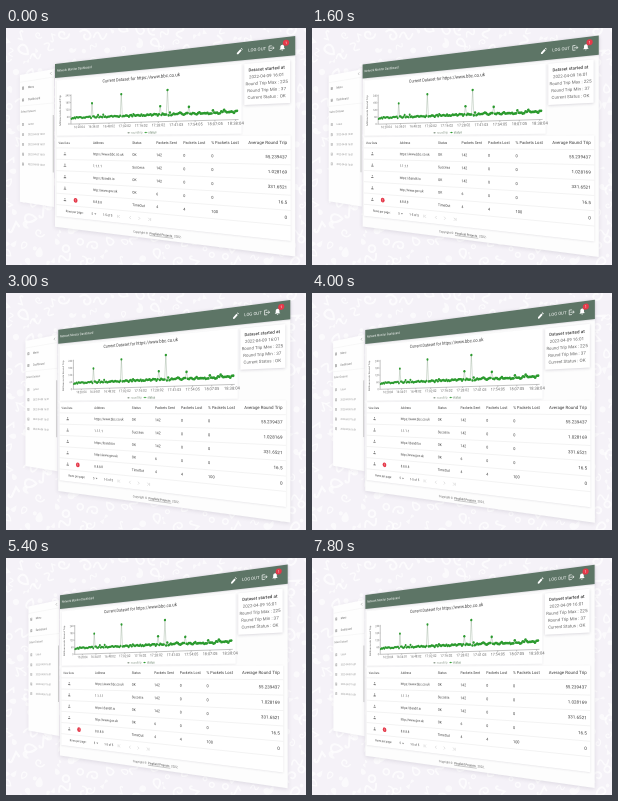
Animation of 300 by 237 pixels, one loop 8000 ms. Source, as an HTML page with a canvas:

```html
<!DOCTYPE html>
<html lang="en">
<head>
<meta charset="utf-8">
<title>Dashboard in perspective</title>
<style>
html, body { margin: 0; width: 100%; height: 100%; overflow: hidden; background: #f5f2f8; }
canvas { display: block; width: 300px; height: 237px; }
</style>
</head>
<body>
<canvas id="stage"></canvas>
<script>
const WIDTH = 300, HEIGHT = 237, HORIZON = 115;
const LOOP = 8000, STEP = 200;
const GREEN = '#5d7566', LEAF = '#2b9a2e', INK = '#3c3c3c', RED = '#e5394a';
const PAGE_WIDTH = 1012;
const FONT = 'Roboto, Arial, sans-serif';

const dpr = window.devicePixelRatio || 1;
const canvas = document.getElementById('stage');
canvas.width = WIDTH * dpr;
canvas.height = HEIGHT * dpr;
const ctx = canvas.getContext('2d');

function seeded(seed) {
  return () => (seed = (seed * 16807) % 2147483647) / 2147483647;
}

function screenSpace() {
  ctx.setTransform(dpr, 0, 0, dpr, 0, 0);
}

// A flat panel turned about a vertical axis: its upright lines stay upright.
// x0, x1: screen edges; h0, h1: height above the horizon at each edge.
class Plane {
  constructor(width, eye, x0, x1, h0, h1) {
    Object.assign(this, { width, eye, x0, x1, h0, h1 });
  }

  project(u, v) {
    const { width, eye, x0, x1, h0, h1 } = this;
    const a = u / width;
    const d = (1 - a) * h1 + a * h0;
    const t = a * h0 / d;
    const dt = h0 * h1 / (d * d * width);
    const k = (h0 + t * (h1 - h0)) / eye;
    return {
      x: x0 + t * (x1 - x0),
      y: HORIZON + (v - eye) * k,
      k,
      dx: (x1 - x0) * dt,
      dy: (v - eye) * (h1 - h0) / eye * dt
    };
  }

  // Draws in panel units around the point (u, v).
  at(u, v, draw) {
    const p = this.project(u, v);
    ctx.setTransform(p.dx * dpr, p.dy * dpr, 0, p.k * dpr, p.x * dpr, p.y * dpr);
    draw();
    screenSpace();
  }

  path(points) {
    ctx.beginPath();
    for (const [u, v] of points) {
      const p = this.project(u, v);
      ctx.lineTo(p.x, p.y);
    }
  }

  line(points, color, weight) {
    this.path(points);
    ctx.strokeStyle = color;
    ctx.lineWidth = weight;
    ctx.stroke();
  }

  rect(u, v, w, h, color, shadow) {
    ctx.save();
    if (shadow) {
      ctx.shadowColor = `rgba(40, 30, 60, ${shadow[0]})`;
      ctx.shadowBlur = shadow[1] * dpr;
      ctx.shadowOffsetY = shadow[1] / 4 * dpr;
    }
    this.path([[u, v], [u + w, v], [u + w, v + h], [u, v + h]]);
    ctx.fillStyle = color;
    ctx.fill();
    ctx.restore();
  }

  dot(u, v, r, color) {
    this.at(u, v, () => {
      ctx.beginPath();
      ctx.arc(0, 0, r, 0, Math.PI * 2);
      ctx.fillStyle = color;
      ctx.fill();
    });
  }

  // Places each letter on its own, so that long lines keep the perspective.
  text(str, u, v, { size = 15, weight = 400, color = INK, align = 0 } = {}) {
    ctx.font = `${weight} ${size}px ${FONT}`;
    ctx.textRendering = 'geometricPrecision';
    ctx.textBaseline = 'middle';
    ctx.fillStyle = color;
    const start = u - ctx.measureText(str).width * align;
    for (let i = 0; i < str.length; i++) {
      const offset = ctx.measureText(str.slice(0, i)).width;
      this.at(start + offset, v, () => ctx.fillText(str[i], 0, 0));
    }
  }
}

function strokeShape(data, color, weight) {
  ctx.strokeStyle = color;
  ctx.lineWidth = weight;
  ctx.stroke(new Path2D(data));
}

function fillShape(data, color) {
  ctx.fillStyle = color;
  ctx.fill(new Path2D(data));
}

const DOODLES = [
  'M-4 0a4 4 0 1 0 8 0a4 4 0 1 0 -8 0',
  'M0 -7C6 -1 6 6 0 6C-6 6 -6 -1 0 -7',
  'M-8 2C-5 -7 -2 -5 0 0S5 6 8 -3',
  'M-3 5a2 2 0 1 0 4 0V-6L6 -3',
  'M-7 3C-7 -6 6 -7 6 0C6 5 -1 5 -1 1'
];

function makeBackground() {
  const layer = document.createElement('canvas');
  layer.width = canvas.width;
  layer.height = canvas.height;
  const g = layer.getContext('2d');
  const rnd = seeded(4127);
  g.fillStyle = '#f5f2f8';
  g.fillRect(0, 0, layer.width, layer.height);
  g.lineCap = 'round';
  for (let row = 0; row < 18; row++) {
    for (let col = 0; col < 22; col++) {
      g.setTransform(dpr, 0, 0, dpr, 0, 0);
      g.translate((col + rnd() * 0.8) * 14, (row + rnd() * 0.8) * 14);
      g.rotate(rnd() * 6.28);
      const size = 0.45 + rnd() * 0.45;
      g.scale(size, size);
      const shape = new Path2D(DOODLES[Math.floor(rnd() * DOODLES.length)]);
      if (rnd() < 0.3) {
        g.fillStyle = 'rgba(255, 255, 255, .6)';
        g.fill(shape);
      } else {
        g.strokeStyle = 'rgba(255, 255, 255, .7)';
        g.lineWidth = 2.4;
        g.stroke(shape);
      }
    }
  }
  return layer;
}

const background = makeBackground();

const spikes = { 21: 165, 49: 223, 83: 115, 89: 232, 106: 100 };
const noise = seeded(907);
const samples = Array.from({ length: 142 }, (_, i) => {
  const value = 44 + noise() * 15 + (noise() < 0.06 ? 11 : 0);
  return [92 + i * 5.15, 275 - (spikes[i] || value) * 0.53];
});

const times = ['16:20:04', '16:34:01', '16:48:02', '17:02:02', '17:16:02',
  '17:28:02', '17:41:03', '17:54:05', '18:07:05', '18:38:04'];

const columns = [205, 395, 502, 615, 724];
const rows = [
  ['https://www.bbc.co.uk', 'OK', '142', '0', '0', '55.239437'],
  ['1.1.1.1', 'Success', '142', '0', '0', '1.028169'],
  ['https://bandit.io', 'OK', '142', '0', '0', '331.6521'],
  ['http://www.gov.uk', 'OK', '6', '0', '0', '16.5'],
  ['8.8.8.8', 'TimeOut', '4', '4', '100', '0']
];

function drawSidebar(p) {
  p.rect(0, 0, 200, 626, '#fefefe', [0.07, 4]);
  p.rect(193, 209, 5, 261, '#c8c8c8');
  p.at(183, 18, () => strokeShape('M3 -6L-3 0L3 6', '#888', 2));
  p.line([[0, 36], [200, 36]], '#f0f0f0', 0.5);
  p.line([[0, 154], [200, 154]], '#f0f0f0', 0.5);

  const items = [['Menu', 67], ['Dashboard', 125], ['Latest', 245]];
  for (let i = 0; i < 4; i++) items.push(['2022-04-0' + (9 - i) + ' 16:01', 295 + i * 48]);
  items.forEach(([label, v], i) => {
    p.at(20, v, () => {
      fillShape('M-6 -7H6V7H-6Z', i < 2 ? '#999' : '#b2b2b2');
      fillShape('M-3 -4H3V-1H-3ZM-3 2H3V4H-3Z', '#fff');
    });
    p.text(label, 50, v, { size: i < 2 ? 15 : 13, color: i < 2 ? '#666' : '#8c8c8c' });
  });
  p.text('Select Dataset', 6, 183, { size: 14, color: '#777' });
}

function drawHeader(p) {
  p.rect(0, 0, PAGE_WIDTH, 64, GREEN, [0.2, 2]);
  p.text('Network Monitor Dashboard', 11, 32, { color: '#fff' });
  p.at(827, 32, () => fillShape('M-9 9V4L3 -8L8 -3L-4 9ZM5 -10L7 -12L12 -7L10 -5Z', '#fff'));
  p.text('LOG OUT', 858, 32, { color: '#fff' });
  p.at(936, 32, () => {
    strokeShape('M1 -8H-8V8H1', '#fff', 2.2);
    strokeShape('M-4 0H8M4 -5L9 0L4 5', '#fff', 2.2);
  });
  p.at(971, 33, () => fillShape('M-9 7L-6 3V-3C-6 -11 6 -11 6 -3V3L9 7ZM-3 9H3L0 12Z', '#fff'));
  p.dot(983, 19, 10, RED);
  p.text('1', 983, 20, { size: 12, color: '#fff', align: 0.5 });
}

function drawChart(p) {
  p.rect(10, 76, 825, 250, '#fff', [0.1, 2]);
  p.text('Current Dataset for https://www.bbc.co.uk', 428, 97, { size: 18.6, align: 0.5 });

  p.at(28, 212, () => {
    ctx.rotate(-Math.PI / 2);
    ctx.font = `13px ${FONT}`;
    ctx.textAlign = 'center';
    ctx.fillStyle = '#555';
    ctx.fillText('Milliseconds Round Trip', 0, 0);
    ctx.textAlign = 'start';
  });
  p.line([[89, 143], [89, 275], [824, 275]], '#8a8a8a', 0.5);
  for (let value = 0; value <= 240; value += 60) {
    const v = 275 - value * 0.53;
    p.line([[84, v], [89, v]], '#8a8a8a', 0.5);
    p.text(String(value), 81, v, { size: 13, color: '#666', align: 1 });
  }
  times.forEach((label, i) => {
    const u = 134 + i * 75.5;
    p.line([[u, 275], [u, 280]], '#8a8a8a', 0.5);
    p.text(label, u, 289, { color: '#666', align: 0.5 });
  });

  p.line(samples, 'rgba(110, 140, 112, .6)', 0.5);
  for (const [u, v] of samples) p.dot(u, v, 5, LEAF);

  p.line([[372, 317], [386, 317]], '#8b9a8b', 0.5);
  p.dot(379, 317, 3, '#8b9a8b');
  p.text('roundtrip', 390, 317, { size: 13, color: '#8b9a8b' });
  p.line([[450, 317], [464, 317]], LEAF, 0.5);
  p.dot(457, 317, 3, LEAF);
  p.text('status', 468, 317, { size: 13, color: '#4a6a4c' });
}

function drawInfo(p) {
  p.rect(844, 78, 152, 146, '#fff', [0.18, 3]);
  const lines = ['Dataset started at', '2022-04-09 16:01', 'Round Trip Max : 225',
    'Round Trip Min : 37', 'Current Status : OK'];
  lines.forEach((line, i) => {
    p.text(line, 919, 102 + i * 24.3, {
      weight: i ? 400 : 500, color: i ? '#666' : INK, align: 0.5
    });
  });
}

function drawTable(p) {
  p.rect(8, 333, 990, 357, '#fff', [0.12, 2]);
  const heads = ['Address', 'Status', 'Packets Sent', 'Packets Lost', '% Packets Lost'];
  p.text('View Data', 20, 358, { size: 14 });
  heads.forEach((head, i) => p.text(head, columns[i], 358));
  p.text('Average Round Trip', 987, 358, { align: 1 });

  rows.forEach((row, i) => {
    const v = 407 + i * 51.3;
    p.line([[8, v - 25.6], [998, v - 25.6]], '#e6e6e6', 0.5);
    p.at(56, v, () => {
      fillShape('M-7 7V4C-4 0 4 0 7 4V7Z', '#808080');
      fillShape('M-3 -4a3 3 0 1 0 6 0a3 3 0 1 0 -6 0', '#808080');
    });
    columns.forEach((u, c) => p.text(row[c], u, v));
    p.text(row[5], 987, v, { align: 1 });
  });
  p.dot(114, 612, 10.5, RED);
  p.text('!', 114, 613, { weight: 500, color: '#fff', align: 0.5 });

  p.line([[8, 638], [998, 638]], '#e6e6e6', 0.5);
  p.text('Rows per page:', 60, 664, { size: 14 });
  p.text('5', 198, 664, { size: 14 });
  p.at(217, 664, () => fillShape('M-5 -3H5L0 3Z', '#777'));
  p.text('1-5 of 5', 255, 664, { size: 14 });
  [334, 386, 427, 471].forEach((u, i) => {
    const s = i < 2 ? 1 : -1;
    p.at(u, 664, () => strokeShape(`M${3 * s} -6L${-3 * s} 0L${3 * s} 6`, '#c4c4c4', 2));
    if (i % 3 === 0) p.at(u - 7 * s, 664, () => strokeShape('M0 -6V6', '#c4c4c4', 2));
  });
}

function drawFooter(p) {
  const style = { size: 12.5, color: '#666' };
  p.text('Copyright © ', 400, 720, style);
  p.text('Pingfield Projects', 473, 720, { ...style, color: '#444' });
  p.line([[473, 728], [574, 728]], '#777', 0.4);
  p.text(' 2022.', 574, 720, style);
}

function render(ms) {
  const e = (1 + Math.cos(2 * Math.PI * (ms - 6000) / 16000)) / 2;
  ctx.setTransform(1, 0, 0, 1, 0, 0);
  ctx.drawImage(background, 0, 0);
  screenSpace();

  drawSidebar(new Plane(200, 336, 12.4 + 10.2 * e, 47.2 + 6.2 * e, 68.2 - 1.6 * e, 74.2 - 1.2 * e));

  const page = new Plane(1000, 359, 48.1 + 6 * e, 286.7 - 8.9 * e, 79.2 - 1.4 * e, 106.2 + 1.8 * e);
  page.rect(0, 0, PAGE_WIDTH, 740, '#fdfdfd', [0.12, 4]);
  drawChart(page);
  drawInfo(page);
  drawTable(page);
  drawFooter(page);
  drawHeader(page);
}

let shown = -1;
function tick(now) {
  const ms = Math.floor(now % LOOP / STEP) * STEP;
  if (ms !== shown) render(shown = ms);
  requestAnimationFrame(tick);
}
render(0);
requestAnimationFrame(tick);
</script>
</body>
</html>
```
